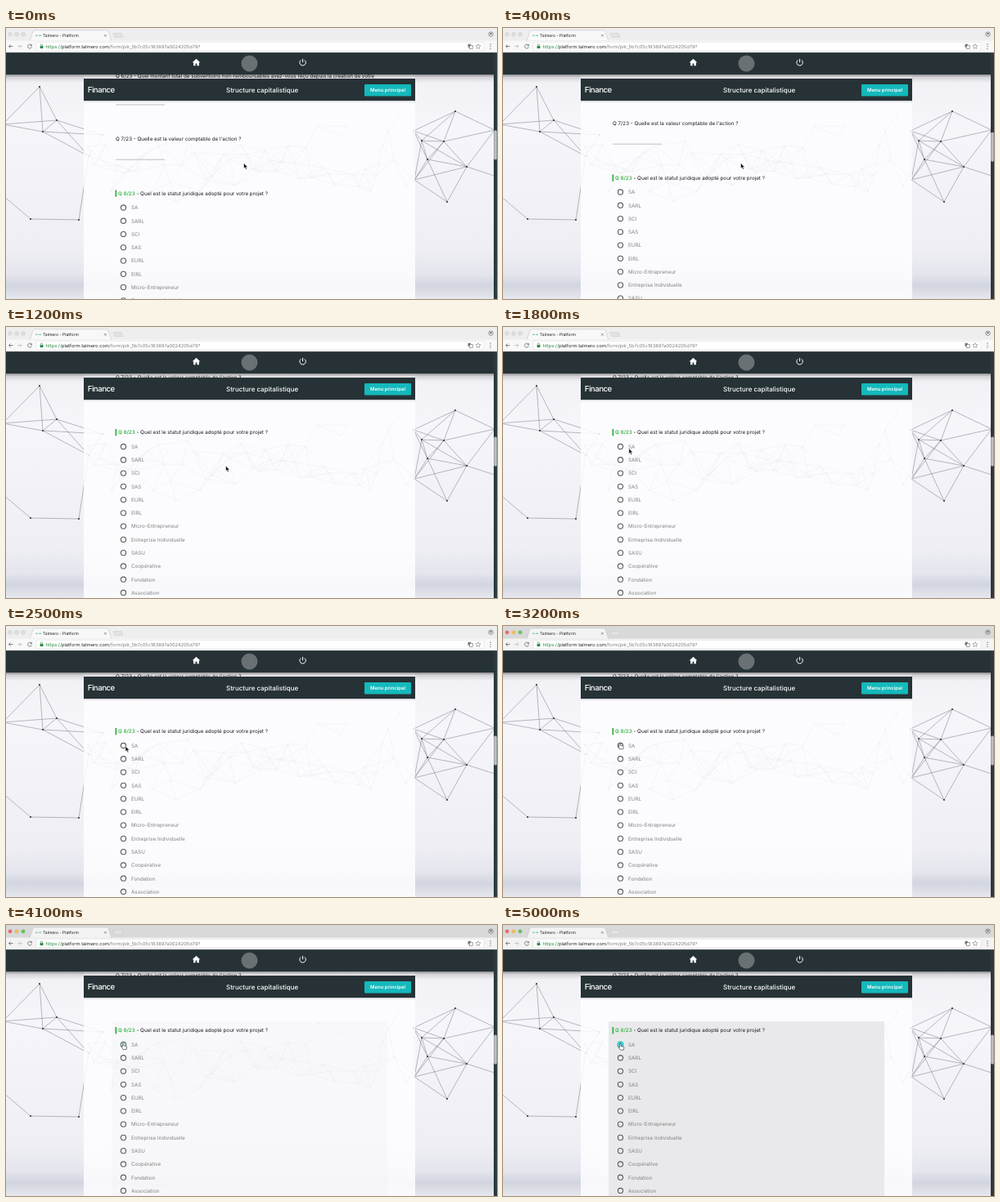
Recreate the animation shown at these times as an HTML page. Size 600 px wide and 332 px high, loop 5100 ms.

```html
<!DOCTYPE html>
<html lang="fr">
<head>
<meta charset="utf-8">
<title>Talmero - Platform</title>
<style>
  html, body { margin: 0; width: 100%; height: 100%; overflow: hidden; background: #f3f3f7; }
  svg { display: block; width: 600px; height: 332px; }
  text { font-family: Inter, Roboto, sans-serif; font-size: 6.27px; fill: #1a1a1c; text-rendering: geometricPrecision; white-space: pre; }
  .head { fill: #fff; font-weight: 500; }
</style>
</head>
<body>
<svg viewBox="0 0 600 332">
  <defs>
    <linearGradient id="sky" x1="0" y1="0" x2="0" y2="1">
      <stop offset="0" stop-color="#efeff3"/>
      <stop offset=".3" stop-color="#f5f5fa"/>
      <stop offset=".8" stop-color="#eeeef4"/>
      <stop offset=".9" stop-color="#e4e5ed"/>
      <stop offset=".945" stop-color="#d2d5df"/>
      <stop offset="1" stop-color="#e6e7ee"/>
    </linearGradient>
    <linearGradient id="shade" x1="0" y1="0" x2="0" y2="1">
      <stop offset="0" stop-color="#000" stop-opacity=".4"/>
      <stop offset=".35" stop-color="#000" stop-opacity=".12"/>
      <stop offset="1" stop-color="#000" stop-opacity="0"/>
    </linearGradient>
  </defs>

  <rect y="30" width="600" height="302" fill="url(#sky)"/>
  <g id="mesh"></g>
  <rect x="95" y="57" width="405" height="275" fill="#fefdff" opacity=".86"/>

  <g id="form">
    <rect id="panel" x="129" y="118" width="337" height="320" fill="#e9e9eb"/>
    <text x="134" y="-12.3">Q 6/23 - Quel montant total de subventions non-remboursables avez-vous reçu depuis la création de votre</text>
    <text x="134" y="64">Q 7/23 - Quelle est la valeur comptable de l'action ?</text>
    <path d="M134 20.5h60M134 87.7h60" stroke="#a5a5a5" stroke-width=".7"/>
    <rect x="133.4" y="125" width="1.9" height="8.3" fill="#3bb54a"/>
    <text x="137" y="131.3"><tspan fill="#3bb54a" font-weight="600">Q 8/23</tspan> - Quel est le statut juridique adopté pour votre projet ?</text>
    <g id="options"></g>
    <circle id="ring" cx="143.5" cy="146.5" r="3.4" fill="#fff" stroke="#18bcc4" stroke-width="1.2"/>
    <circle id="dot" cx="143.5" cy="146.5" fill="#18bcc4"/>
  </g>

  <rect y="57" width="596" height="10" fill="url(#shade)"/>
  <rect x="95" y="89" width="405" height="3" fill="url(#shade)" opacity=".6"/>
  <rect x="95" y="62" width="405" height="27" fill="#263236"/>
  <text class="head" x="99.7" y="79.2" style="font-size:9.7px;letter-spacing:-.5px">Finance</text>
  <text class="head" x="269" y="79" style="font-size:7.95px">Structure capitalistique</text>
  <rect x="438" y="69" width="57" height="14.5" rx="1" fill="#14b9bc"/>
  <text class="head" x="445" y="78.4" style="font-size:5.98px;font-weight:600">Menu principal</text>

  <rect y="30" width="600" height="27" fill="#263236"/>
  <path d="M232.5 37.8l-4.8 4.4h1.4v4h2.5v-2.8h1.8v2.8h2.5v-4h1.4z" fill="#fff"/>
  <path d="M360.4 39.3a3.7 3.7 0 1 0 4.4 0M362.6 37.8v4.4" fill="none" stroke="#fff"/>
  <circle cx="297.5" cy="43.5" r="10" fill="#697175"/>

  <rect x="596" y="30" width="4" height="302" fill="#2c3a3f"/>
  <rect id="thumb" x="596.2" width="3.6" height="36" rx="1.6" fill="#b9bfc2"/>

  <rect id="strip" width="600" height="16"/>
  <g id="lights" stroke="#bcbcbe" stroke-width=".4"></g>
  <path id="tab" d="M29 16l4-12q.5-1.2 2-1.2h88q1.5 0 2 1.2l4 12z" stroke="#bdbdbd" stroke-width=".5"/>
  <path d="M131 6.5h10l2 5h-10z" fill="#e2e2e2" stroke="#c2c2c2" stroke-width=".4"/>
  <path d="M36 9.2h2.8M40.2 9.2h2.8" stroke="#2bb5a0" stroke-width=".9"/>
  <text x="45" y="11" style="font-size:5px">Talmero - Platform</text>
  <path d="M120 7.8l2.8 2.8m0-2.8l-2.8 2.8" stroke="#555" stroke-width=".6"/>
  <circle cx="592.5" cy="7.6" r="2.7" fill="none" stroke="#666" stroke-width=".7"/>
  <circle cx="592.5" cy="7.2" r="1.1" fill="#666"/>

  <rect id="bar" y="15.5" width="600" height="14.5"/>
  <path d="M0 29.8h600" stroke="#b9b9b9" stroke-width=".5"/>
  <rect x="37" y="17.3" width="547" height="10.6" rx="1.5" fill="#fff" stroke="#cfcfcf" stroke-width=".4"/>
  <g fill="none" stroke="#666" stroke-width=".8">
    <path d="M8.5 22.5h-5m2.2-2.2l-2.2 2.2l2.2 2.2"/>
    <path d="M14 22.5h5m-2.2-2.2l2.2 2.2l-2.2 2.2" stroke="#bbb"/>
    <path d="M31.2 21.3a2.5 2.5 0 1 0 .2 2m0-3.3v1.8h-1.8"/>
    <path d="M42.3 22v-1a1.2 1.2 0 0 1 2.4 0v1" stroke="#2a8a45" stroke-width=".6"/>
    <rect x="564.5" y="19.7" width="3.5" height="4" fill="#777" stroke="none"/>
    <rect x="566.5" y="21.3" width="3.7" height="4" fill="#fff" stroke-width=".6"/>
    <path d="M577 19.5l.9 2 2.200 .2-1.700 1.500 .5 2.200-1.900-1.200-1.900 1.200 .5-2.200-1.700-1.500 2.200-.2z" stroke-width=".5"/>
  </g>
  <rect x="41.6" y="22" width="3.8" height="3" fill="#2a8a45"/>
  <text x="48.5" y="24.7" style="font-size:5.74px;fill:#7c7c7c"><tspan fill="#2a8a45">https://</tspan><tspan fill="#222">platform.talmero.com</tspan>/form/pilr_5b7c05c183897a0024205d79?</text>
  <path d="M592 20v5.400" stroke="#666" stroke-width="1.300" stroke-linecap="round" stroke-dasharray="0 2.600"/>

  <path id="arrow" d="M0 0v6.600l1.500-1.300 1.100 2.500 1.200-.5-1.100-2.400h2.100z" fill="#111" stroke="#fff" stroke-width=".5"/>
  <path id="hand" d="M-.8 .7q0-.8 .8-.8t.8 .8v2.300l2.900 .7q.8 .3 .7 1.100l-.5 2.800h-4l-2-3q-.3-.8 .4-.9l.9 .6z" fill="#fff" stroke="#222" stroke-width=".6"/>
</svg>

<script>
const NS = 'http://www.w3.org/2000/svg';
const $ = id => document.getElementById(id);
function set(el, attrs) {
  for (const k in attrs) el.setAttribute(k, attrs[k]);
  return el;
}
function add(parent, tag, attrs, text = '') {
  const el = set(document.createElementNS(NS, tag), attrs);
  el.textContent = text;
  parent.append(el);
  return el;
}

let seed = 11;
const rand = () => (seed = seed * 16807 % 2147483647) / 2147483647;

// Joins every pair of nodes closer than reach.
function net(nodes, reach, line, dot, r) {
  let d = '';
  nodes.forEach((p, i) => nodes.slice(i + 1).forEach(q => {
    if (Math.hypot(p[0] - q[0], p[1] - q[1]) < reach) d += `M${p}L${q}`;
  }));
  add($('mesh'), 'path', { d, stroke: line, 'stroke-width': .5, fill: 'none' });
  nodes.forEach(([cx, cy]) => add($('mesh'), 'circle', { cx, cy, r, fill: dot }));
}
net([[41, 72], [62, 113], [45, 127], [118, 131], [89, 235], [30, 234], [-4, 118], [-4, 205], [101, 157]],
    90, '#75787d', '#34383c', 1.1);
net([[549, 102], [508, 138], [597, 125], [563, 170], [515, 161], [539, 213], [499, 186], [600, 182], [535, 139], [498, 126]],
    66, '#75787d', '#34383c', 1.1);

// Faint web behind the card: wide at both ends, narrow in between.
const faint = Array.from({ length: 56 }, (_, i) => {
  const x = 100 + i * 7.2;
  const wave = Math.cos((x - 200) / 80);
  return [x, 165 + 15 * wave + (rand() - .5) * (25 + 75 * Math.abs(wave))];
});
net(faint, 38, '#8d9096', '#808388', .8);

['SA', 'SARL', 'SCI', 'SAS', 'EURL', 'EIRL', 'Micro-Entrepreneur', 'Entreprise Individuelle',
 'SASU', 'Coopérative', 'Fondation', 'Association'].forEach((name, i) => {
  const cy = 146.5 + i * 16.27;
  add($('options'), 'circle', { cx: 143.5, cy, r: 3.1, fill: 'none', stroke: '#5c5c5c', 'stroke-width': 1.1 });
  add($('options'), 'text', { x: 153, y: cy + 2.3, style: 'fill:#808080' }, name);
});

const lamps = ['#f2665c', '#f4bd4f', '#5fc454'].map((on, i) =>
  ({ on, el: add($('lights'), 'circle', { cx: 5 + 8 * i, cy: 7.8, r: 2.4 }) }));

const linear = p => p;
const easeOut = p => 1 - (1 - p) ** 3;

// Each move runs from one time to another and ends on the given values.
function track(first, moves, ease) {
  return t => moves.reduce((v, [from, to, ...end]) => {
    const p = ease(Math.min(1, Math.max(0, (t - from) / (to - from))));
    return v.map((x, i) => x + (end[i] - x) * p);
  }, first);
}
const scroll = track([73.5], [[0, 200, 62.5], [300, 500, 46.5], [1000, 1200, 0]], linear);
const pointer = track([290.5, 165.5],
  [[600, 800, 268.5, 170], [1200, 2200, 146, 147.2], [2900, 3300, 142.8, 143.2], [4000, 4300, 143.5, 145.5]], easeOut);
const select = track([0], [[4000, 4400, 1]], linear);

const LOOP = 5100, STEP = 100;
const start = performance.now();
function draw(now) {
  const t = Math.floor(Math.max(0, now - start) % LOOP / STEP) * STEP;
  const [y] = scroll(t), [px, py] = pointer(t), [on] = select(t);
  const focused = t >= 3000;

  set($('form'), { transform: `translate(0 ${y})` });
  set($('thumb'), { y: 134.5 - y / 8 });
  set($('panel'), { opacity: on });
  set($('ring'), { opacity: on });
  set($('dot'), { r: 2.4 * on });

  const chrome = focused ? '#f3f3f3' : '#f8f8f8';
  set($('strip'), { fill: focused ? '#d9d9da' : '#eeeeef' });
  set($('tab'), { fill: chrome });
  set($('bar'), { fill: chrome });
  lamps.forEach(l => set(l.el, { fill: focused ? l.on : '#e0e0e1' }));

  const transform = `translate(${px} ${py})`;
  set($('arrow'), { transform, visibility: focused ? 'hidden' : 'visible' });
  set($('hand'), { transform, visibility: focused ? 'visible' : 'hidden' });
  requestAnimationFrame(draw);
}
draw(start);
</script>
</body>
</html>
```
